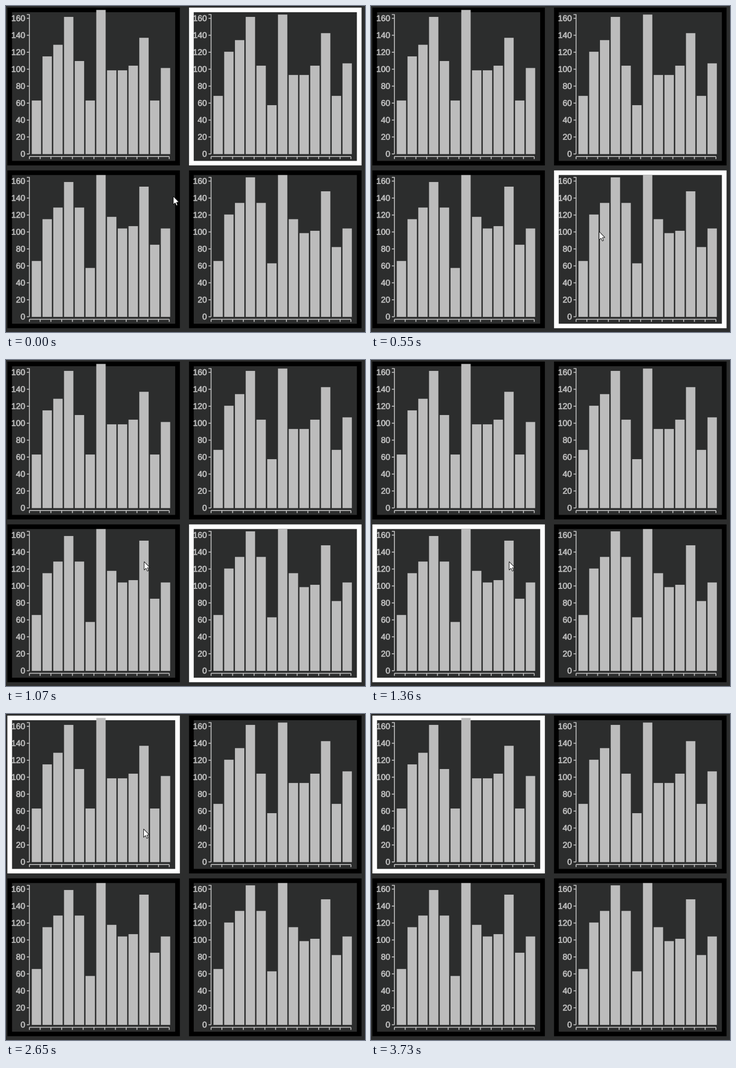
Animation of 690 by 628 pixels, one loop 4.47 s. Source, as a matplotlib script:

```python
import numpy as np
import matplotlib.pyplot as plt
from matplotlib.animation import FuncAnimation
from matplotlib.collections import LineCollection
from matplotlib.patches import PathPatch, Polygon, Rectangle
from matplotlib.textpath import TextPath
from matplotlib.transforms import Affine2D

W, H, DPI = 690, 628, 100
STEP, LOOP = 10, 4470
PX = 72 / DPI

BACK, GREY = "#2c2d2d", "#bcbcbc"
DX, DY = 349.2, 313.6          # distance between panels
LEFT, BASE = 45, 285.0         # origin of the value axis
UNIT, PITCH, TICK_GAP = 4.475, 20.67, 32.66

# Shape shared by all charts; each panel varies it
PROFILE = np.array([24, 43, 48, 59, 39, 22, 61, 35, 35, 38, 51, 24, 38])

# Start time and panel (column, row) that gets the white border
SELECTED = [(0, (1, 0)), (550, (1, 1)), (1360, (0, 1)), (2650, (0, 0))]

ARROW = np.array([(0.5, 0.5), (0.5, 16.6), (4.1, 13.2), (6.6, 18.6),
                  (8.9, 17.7), (6.7, 12.2), (11.5, 11.9)])


def ease_out(u):
    return 1 - (1 - u) ** 3


def ease_in_out(u):
    return u ** 3 * (u * (6 * u - 15) + 10)


# Pointer strokes: first and last step time, steps, end point, easing
START = (321, 366)
STROKES = [
    (130, 270, 2, (438, 434), ease_out),
    (810, 1070, 3, (265, 388), ease_out),
    (1670, 1820, 2, (264, 221), ease_out),
    (3160, 3730, 5, (659, 636), ease_in_out),
]

fig = plt.figure(figsize=(W / DPI, H / DPI), dpi=DPI, facecolor=BACK)
ax = fig.add_axes([0, 0, 1, 1])
ax.set_xlim(0, W)
ax.set_ylim(H, 0)
ax.axis("off")


def bar_heights(col, row):
    i = np.arange(len(PROFILE))
    season = 1.4 * (2 * col - 1) * np.cos(np.pi * (i / 6 - row / 2))
    swell = np.maximum(0, np.cos(2 * np.pi * (i - 4) / 3.3))
    swell *= 9 * row * np.clip((i - 1) / 3, 0, 1)
    return np.minimum(np.round(PROFILE + season + swell), 62)


def box(x0, y0, x1, y1, color, z):
    patch = Rectangle((x0, y0), x1 - x0, y1 - y0, facecolor=color,
                      linewidth=0, zorder=z, snap=False)
    return ax.add_patch(patch)


def label(right, baseline, text):
    """Right-aligned text, emboldened by a thin outline."""
    path = TextPath((0, 0), text, size=16, prop={"family": "Liberation Sans"})
    place = Affine2D().translate(-path.get_extents().x1, 0)
    place.scale(1, -1).translate(right, baseline)
    ax.add_patch(PathPatch(place.transform_path(path), facecolor=GREY,
                           edgecolor=GREY, linewidth=0.8 * PX, zorder=4,
                           snap=False))


def draw_axes(dx, dy):
    left, right = LEFT + dx, LEFT + dx + len(PROFILE) * PITCH
    zero, top, bottom = BASE + dy, BASE + dy - 60 * UNIT, 289.9 + dy
    lines = [
        [(left - 5, top), (left, top), (left, zero)],
        [(left, bottom), (right, bottom)],
    ]
    for x in np.linspace(left, right, len(PROFILE) + 1):
        lines.append([(x, bottom), (x, bottom + 5)])
    for i in range(9):
        y = zero - i * TICK_GAP
        lines.append([(left - 5, y), (left, y)])
        label(left - 8.7, y + 5.3, str(20 * i))
    ax.add_collection(LineCollection(lines, colors=GREY, zorder=3,
                                     linewidths=1.75 * PX, snap=False,
                                     capstyle="butt"), autolim=False)


def draw_panel(col, row):
    dx, dy = col * DX, row * DY
    border = box(2.6 + dx, 3.1 + dy, 334.2 + dx, 307.1 + dy, "black", 1)
    box(11.6 + dx, 12 + dy, 325.2 + dx, 298.4 + dy, BACK, 2)
    for i, n in enumerate(bar_heights(col, row)):
        x = LEFT + 4.5 + i * PITCH + dx
        box(x, BASE - n * UNIT + dy, x + 18, BASE + 0.3 + dy, GREY, 3)
    draw_axes(dx, dy)
    return border


borders = {(c, r): draw_panel(c, r) for r in range(2) for c in range(2)}
pointer = ax.add_patch(Polygon(ARROW, closed=True, facecolor="white",
                               edgecolor="black", linewidth=0.9 * PX,
                               zorder=6, joinstyle="miter", snap=False))


def pointer_tip(t):
    tip = np.array(START, float)
    for first, last, steps, end, ease in STROKES:
        if t >= first:
            done = 1 + (t - first) * (steps - 1) // (last - first)
            tip += (np.array(end) - tip) * ease(min(done, steps) / steps)
    return np.round(tip)


def update(frame):
    t = frame * STEP
    active = [panel for start, panel in SELECTED if start <= t][-1]
    for panel, border in borders.items():
        border.set_facecolor("white" if panel == active else "black")
    pointer.set_xy(ARROW + pointer_tip(t))
    return [*borders.values(), pointer]


anim = FuncAnimation(fig, update, frames=LOOP // STEP, interval=STEP,
                     repeat=True, repeat_delay=0, blit=False)
plt.show()
```
